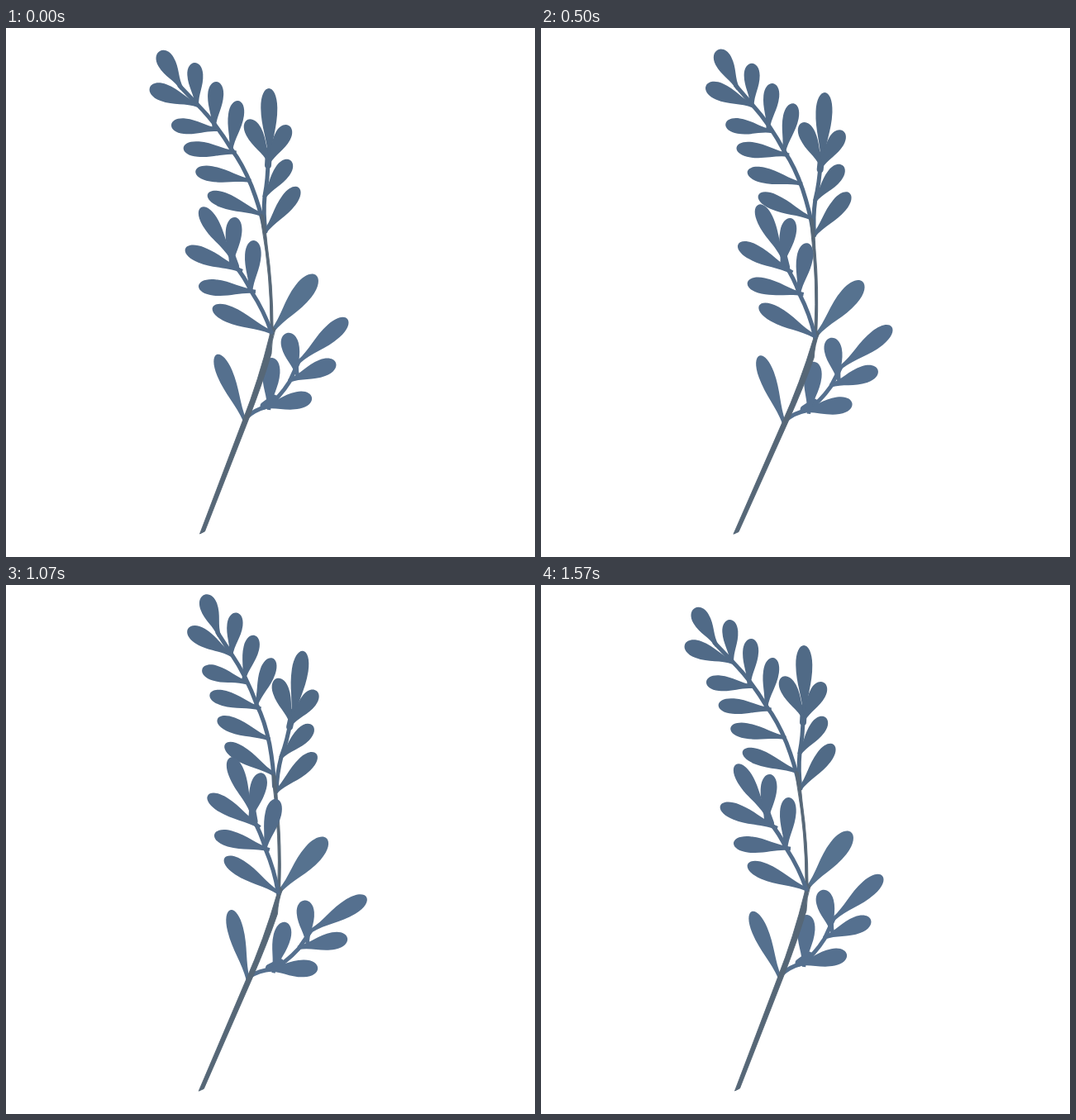
These frames come from a looping animation (640 px wide and 640 px high, 2 s). An HTML page:

```html
<!DOCTYPE html>
<html lang="en">
<head>
<meta charset="utf-8">
<title>Swaying branch</title>
<style>
html, body { margin: 0; width: 100%; height: 100%; overflow: hidden; background: #fff; }
svg { display: block; width: 100vw; height: 100vh; }
</style>
</head>
<body>
<svg id="stage" viewBox="0 0 640 640"></svg>
<script>
const NS = 'http://www.w3.org/2000/svg';
const LOOP = 2000, FPS = 14, LAST = 22;
const ROOT = [243, 580];

// A row spreads n leaves: bases run along one curve, tips along another.
const row = (n, width, bases, tips) => ({ n, width, bases, tips });

// swing: degrees added to the stem's sway, with its first, peak and final step
const parts = [
  { // crown
    color: '#506a87', pivot: [311, 232], swing: [12, 7, 13, LAST],
    twigs: [['M312 240Q307 217 297 191Q286 164 273 147Q254 115 231 92L210 70', 5]],
    rows: [
      row(2, 10.6, [[213, 74], [233, 94]], [[186, 28], [174, 72]]),
      row(3, 9.5, [[231, 94], [272, 148]], [[228, 42], [281, 88]]),
      row(4, 9.3, [[257, 123], [288, 167], [310, 226]], [[200, 117], [244, 201]])
    ]
  },
  { // side twig
    color: '#506a86', pivot: [313, 244], swing: [7.8, 7, 14.5, LAST],
    twigs: [['M314 246Q311 225 313 203Q317 183 317 158', 5], ['M317 166L318 148', 8]],
    rows: [
      row(2, 10, [[319, 157], [319, 162]], [[318, 73], [292, 111]]),
      row(3, 9.8, [[317, 164], [312, 205], [313, 247]], [[342, 118], [344, 160], [354, 193]])
    ]
  },
  { // low twig
    color: '#55708f', pivot: [292, 470], swing: [7.7, 8, 15, LAST],
    twigs: [['M290 472Q300 462 316 458Q331 447 343 428L354 404', 5], ['M312 457L324 448', 9]],
    rows: [
      row(2, 10.6, [[353, 421], [318, 462]], [[340, 369], [322, 399]]),
      row(3, 10.4, [[354, 404], [342, 427], [310, 459]], [[413, 352], [399, 405], [370, 447]])
    ]
  },
  { // single low leaf
    color: '#55708e', pivot: [289, 472], swing: [6.6, 8, 15.5, LAST], twigs: [],
    rows: [row(1, 9.6, [[289, 475]], [[255, 395]])]
  },
  { // single leaf at the fork
    color: '#56728f', pivot: [323, 364], swing: [5.2, 7, 11.5, 17], twigs: [],
    rows: [row(1, 12, [[322, 367]], [[375, 299]])]
  },
  { // stem
    color: '#566777', pivot: ROOT, swing: [0, 0, 1, LAST], twigs: [], rows: [],
    shape: 'M234.5 612L286 476Q306 425 319 372L320 360Q320 300 309.5 240L308 225' +
           'L311.5 227Q314 240 316 262Q323 312 323 362L326 364Q321 378 321 394' +
           'Q311 428 294 472L240.5 609Z'
  },
  { // middle twig
    color: '#526c8a', pivot: [320, 366], swing: [12.5, 4.5, 12, LAST],
    twigs: [['M321 368Q312 342 297 319Q288 300 276 286', 5], ['M278 288L270 266', 8]],
    rows: [
      row(3, 9.8, [[273, 278], [272, 290], [296, 320]], [[236, 217], [277, 229], [300, 257]]),
      row(3, 9.8, [[286, 294], [302, 319], [321, 368]], [[217, 267], [233, 312], [250, 338]])
    ]
  }
];

function add(parent, tag, attrs) {
  const el = document.createElementNS(NS, tag);
  for (const k in attrs) el.setAttribute(k, attrs[k]);
  return parent.appendChild(el);
}

// Point on the line through two points, or the parabola through three
function along(points, u) {
  const first = points[0], last = points[points.length - 1];
  return first.map((a, k) => {
    const b = last[k];
    const bulge = points.length > 2 ? points[1][k] - (a + b) / 2 : 0;
    return a + (b - a) * u + 4 * u * (1 - u) * bulge;
  });
}

// Teardrop from a thin stalk to a rounded tip
function leafPath([x0, y0], [x1, y1], w) {
  const dx = x1 - x0, dy = y1 - y0, len = Math.hypot(dx, dy), stalk = 2.2;
  const at = (u, v) => {
    const x = x0 + dx * u - dy / len * v, y = y0 + dy * u + dx / len * v;
    return x.toFixed(2) + ' ' + y.toFixed(2) + ' ';
  };
  return 'M' + at(0, -stalk) +
    'C' + at(.26, -stalk) + at(.44, -w) + at(.72, -w) +
    'C' + at(.9, -w) + at(1, -w * .52) + at(1, 0) +
    'C' + at(1, w * .52) + at(.9, w) + at(.72, w) +
    'C' + at(.44, w) + at(.26, stalk) + at(0, stalk) + 'Z';
}

const plant = add(document.getElementById('stage'), 'g', {});
for (const part of parts) {
  const { color } = part;
  part.el = add(plant, 'g', { fill: color });
  for (const [d, width] of part.twigs) {
    add(part.el, 'path', {
      d, fill: 'none', stroke: color, 'stroke-width': width,
      'stroke-linecap': 'round', 'stroke-linejoin': 'round'
    });
  }
  for (const { n, width, bases, tips } of part.rows) {
    for (let i = 0; i < n; i++) {
      const u = n > 1 ? i / (n - 1) : 0;
      add(part.el, 'path', { d: leafPath(along(bases, u), along(tips, u), width) });
    }
  }
  if (part.shape) add(part.el, 'path', { d: part.shape, stroke: color, 'stroke-width': .9 });
}

const clamp = u => Math.min(1, Math.max(0, u));
const fade = (u, power) => Math.pow(1 - clamp(u), power);

// The stem bends over during the first half and returns in the second
function stemSway(step) {
  const mid = LAST / 2;
  return 3.8 * (step < mid ? 1 - fade(step / mid, 1.4) : fade(step / mid - 1, 1.1));
}

// Eased rise to the peak, then a quick fall that slows down
function swingAt([size, from, peak, to], step) {
  if (step > peak) return size * fade((step - peak) / (to - peak), 1.4);
  return size * (1 - Math.cos(Math.PI * clamp((step - from) / (peak - from)))) / 2;
}

// Motion advances in steps on a 10 ms grid, then rests
function stepAt(ms) {
  let i = LAST;
  while (i > 0 && Math.round(i * 100 / FPS) * 10 > ms) i--;
  return i;
}

function render(ms) {
  const step = stepAt(ms % LOOP), sway = stemSway(step);
  plant.setAttribute('transform',
    `translate(0 ${sway * .25}) rotate(${sway} ${ROOT.join(' ')})`);
  for (const { el, swing, pivot } of parts) {
    el.setAttribute('transform', `rotate(${swingAt(swing, step)} ${pivot.join(' ')})`);
  }
}

const start = performance.now();
function tick() {
  render(performance.now() - start);
  requestAnimationFrame(tick);
}
tick();
</script>
</body>
</html>
```
